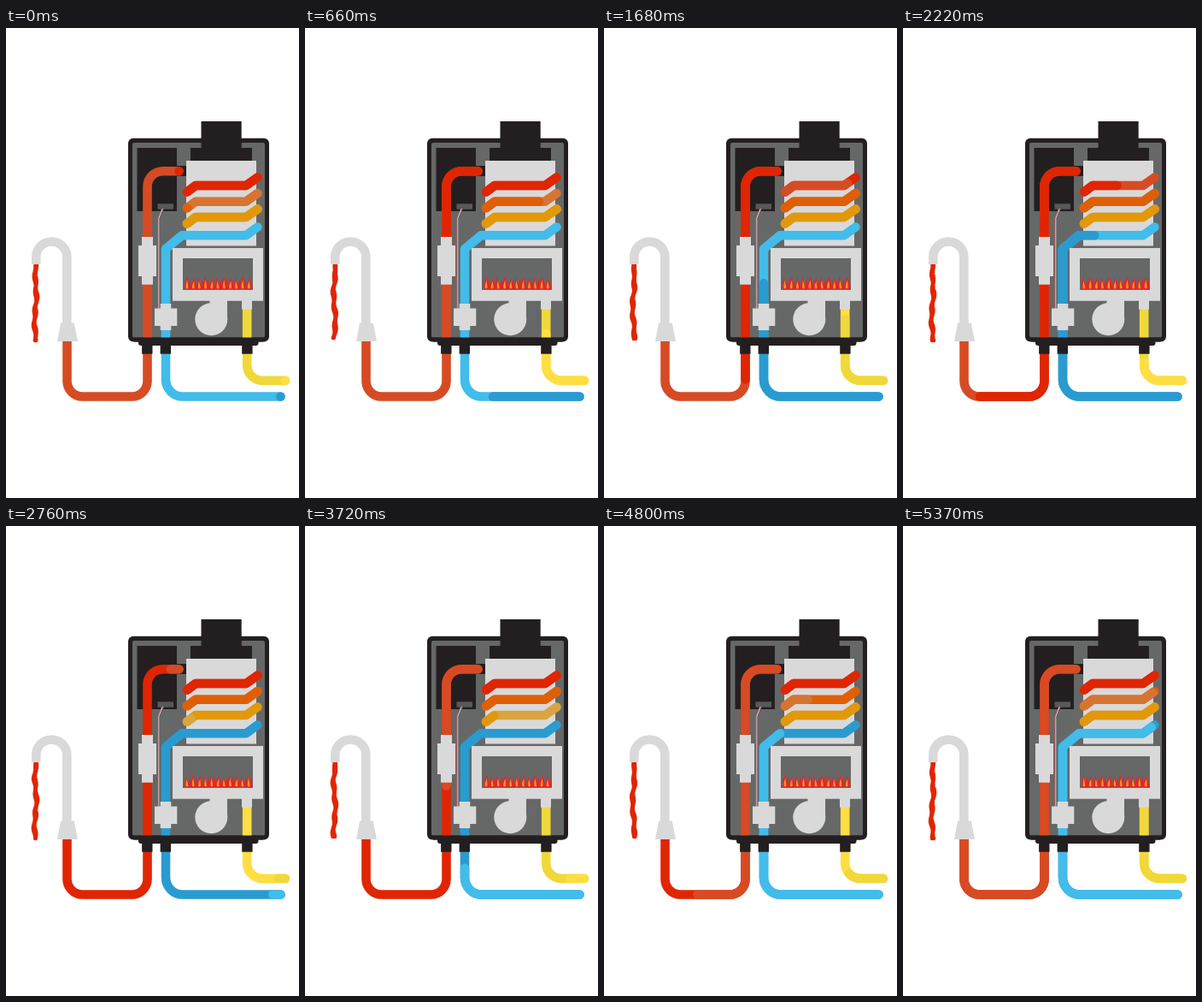
Write an HTML page with a canvas that moves like this. It is 343 by 549 pixels and loops after 5.4 s.

```html
<!DOCTYPE html>
<html lang="en">
<head>
<meta charset="utf-8">
<title>Water heater</title>
<style>
html, body { margin: 0; width: 100%; height: 100%; overflow: hidden; background: #fff; }
canvas { display: block; }
</style>
</head>
<body>
<canvas id="stage" width="343" height="549"></canvas>
<script>
const ctx = document.getElementById('stage').getContext('2d');
const LOOP = 5400, STEP = 30;
const DARK = '#231f20', GREY = '#666867', PALE = '#d9d9d9';
const RED = '#e02502', DULL_RED = '#d64b24';

// Points are [x, y, corner radius]; rounded corners are right angles.
function makePipe(points) {
  const path = new Path2D();
  let length = 0;
  points.forEach(([x, y, r = 0], i) => {
    if (i === 0) { path.moveTo(x, y); return; }
    const [px, py] = points[i - 1];
    length += Math.hypot(x - px, y - py);
    if (r) {
      path.arcTo(x, y, points[i + 1][0], points[i + 1][1], r);
      length -= r * (2 - Math.PI / 2);
    } else path.lineTo(x, y);
  });
  return { path, length };
}

const makeCoil = y => makePipe([[212, y + 7.5], [222, y], [281, y], [294.5, y - 9.5]]);

const hotPipe = makePipe([[202.5, 167.3], [165.5, 167.3, 18], [165.5, 430.5, 18], [71.5, 430.5, 18], [71.5, 364]]);
const coldPipe = makePipe([[321.5, 430.5], [187, 430.5, 20], [187, 258], [206, 242.3], [281, 242.3], [294.5, 232.5]]);
const gasPipe = makePipe([[327, 411.8], [282.2, 411.8, 18], [282.2, 324]]);
const redCoil = makeCoil(184), orangeCoil = makeCoil(202.7), amberCoil = makeCoil(221);

function rect(color, x1, y1, x2, y2, r = 0) {
  ctx.fillStyle = color;
  ctx.beginPath();
  ctx.roundRect(x1, y1, x2 - x1, y2 - y1, r);
  ctx.fill();
}

function poly(color, points) {
  ctx.fillStyle = color;
  ctx.beginPath();
  points.forEach(([x, y]) => ctx.lineTo(x, y));
  ctx.fill();
}

// Paints a pipe with a new colour advancing over the old one.
function drawPipe(pipe, oldColor, newColor, part, width = 10.6) {
  ctx.lineWidth = width;
  ctx.lineCap = ctx.lineJoin = 'round';
  ctx.strokeStyle = oldColor;
  ctx.stroke(pipe.path);
  ctx.strokeStyle = newColor;
  ctx.setLineDash([Math.max(0.1, part * pipe.length), pipe.length * 2]);
  ctx.stroke(pipe.path);
  ctx.setLineDash([]);
}

function alternate(pipe, first, second, half, t, width) {
  const n = Math.floor(t / half), part = t / half - n;
  if (n % 2) drawPipe(pipe, first, second, part, width);
  else drawPipe(pipe, second, first, part, width);
}

// A dull pulse enters at start, and the bright colour follows 900 ms later.
function pulseCoil(coil, bright, dull, start, t) {
  const age = (t - start + LOOP) % LOOP;
  if (age < 900) drawPipe(coil, bright, dull, age / 900);
  else drawPipe(coil, dull, bright, Math.min(1, (age - 900) / 900));
}

function drawCase() {
  rect(DARK, 143, 128.7, 308, 366.5, 6);
  rect(GREY, 148, 134, 303, 361.5, 2);
  rect(DARK, 228.5, 109, 275.7, 156);
  rect(DARK, 216, 140, 288, 156);
  rect(DARK, 153.5, 140, 200, 214);
  rect(DARK, 199, 161, 213, 173);
  rect(PALE, 211, 155, 293, 254.5);
}

function flameShape(color, x, base, w, h, lean) {
  const top = base - h;
  ctx.fillStyle = color;
  ctx.beginPath();
  ctx.moveTo(x, base);
  ctx.bezierCurveTo(x - w, base, x - w * 0.6, base - h * 0.5, x + lean, top);
  ctx.bezierCurveTo(x + lean * 0.4, base - h * 0.6, x + w, base, x, base);
  ctx.fill();
}

function drawFlames(t) {
  for (let i = 0; i < 11; i++) {
    const x = 212 + i * 7.22;
    const phase = t / 600 * Math.PI * 2 + i * 2.1;
    const lean = Math.sin(phase) * 1.6;
    const h = 14.7 + Math.cos(phase) * 1.2;
    flameShape('#e5242b', x, 305.5, 5, h, lean);
    flameShape('#e5242b', x + 3, 305.5, 3.2, h * 0.85, -lean);
    flameShape('#f7941e', x + 0.2, 304.5, 2.7, h * 0.66, lean * 0.6);
  }
}

function drawBurner(t) {
  rect(PALE, 195, 257, 301, 318.7);
  rect(GREY, 207, 269, 289, 306);
  drawFlames(t);
  rect(PALE, 238.5, 316, 259, 341);
  ctx.fillStyle = PALE;
  ctx.beginPath();
  ctx.arc(240.3, 340.3, 19, 0, Math.PI * 2);
  ctx.fill();
  rect(PALE, 276, 317, 288, 328.7);
}

function drawWires() {
  rect('#58595b', 177.5, 205.3, 196, 211.7);
  ctx.lineCap = 'butt';
  ctx.lineJoin = 'miter';
  ctx.lineWidth = 1;
  ['#d8444a', '#e8e8e8', '#52646d'].forEach((color, i) => {
    ctx.strokeStyle = color;
    ctx.beginPath();
    ctx.moveTo(182.5 + i, 211);
    ctx.lineTo(178 + i, 222);
    ctx.lineTo(178 + i, 328);
    ctx.stroke();
  });
}

function drawFittings() {
  rect(PALE, 159, 244, 172, 299.7);
  rect(PALE, 155, 254, 176, 290);
  rect(PALE, 180.7, 322, 193.3, 353);
  rect(PALE, 174, 327.5, 200.3, 348);
  rect(DARK, 150, 361.5, 301, 366.5);
  rect(DARK, 155, 364, 295.5, 371, 3);
  for (const x of [165.3, 186.8, 282.4]) rect(DARK, x - 6.2, 368, x + 6.2, 380.7);
}

function drawStream(t) {
  const end = 364 + Math.cos(t / 450 * Math.PI * 2) * 1.5;
  const turn = t / 450 * Math.PI * 2;
  ctx.strokeStyle = RED;
  ctx.lineWidth = 4.6;
  ctx.lineCap = ctx.lineJoin = 'round';
  for (const side of [-0.7, 0.7]) {
    ctx.beginPath();
    for (let y = 277; y <= end; y += 1) {
      const grow = Math.min(1, (y - 276) / 20);
      const x = 35.3 - grow * 0.8 + side
        + grow * (1.1 * Math.sin(y / 9.5 - turn) + 0.8 * Math.sin(y / 3.1 - turn * 2 + side));
      ctx.lineTo(x, y);
    }
    ctx.stroke();
  }
}

function drawTap() {
  ctx.strokeStyle = PALE;
  ctx.lineWidth = 10.6;
  ctx.lineCap = 'butt';
  ctx.beginPath();
  ctx.moveTo(35.3, 276);
  ctx.lineTo(35.3, 267.5);
  ctx.arc(53.3, 267.5, 18, Math.PI, 0);
  ctx.lineTo(71.3, 348);
  ctx.stroke();
  poly(PALE, [[64, 344.5], [79.7, 344.5], [84, 366], [60, 366]]);
}

function draw(t) {
  ctx.fillStyle = '#fff';
  ctx.fillRect(0, 0, 343, 549);
  drawCase();
  alternate(hotPipe, RED, DULL_RED, 2700, t);
  alternate(coldPipe, '#2a9bd0', '#42bcea', 2700, t);
  pulseCoil(amberCoil, '#e2980a', '#d8a541', 2700, t);
  pulseCoil(orangeCoil, '#e05f06', '#d67532', 4500, t);
  pulseCoil(redCoil, RED, DULL_RED, 900, t);
  alternate(gasPipe, '#ffde42', '#f0d83a', 900, t);
  drawBurner(t);
  drawWires();
  drawFittings();
  drawStream(t);
  drawTap();
}

const begin = performance.now();
function tick() {
  const t = (performance.now() - begin) % LOOP;
  draw(Math.floor(t / STEP) * STEP);
  requestAnimationFrame(tick);
}
tick();
</script>
</body>
</html>
```
